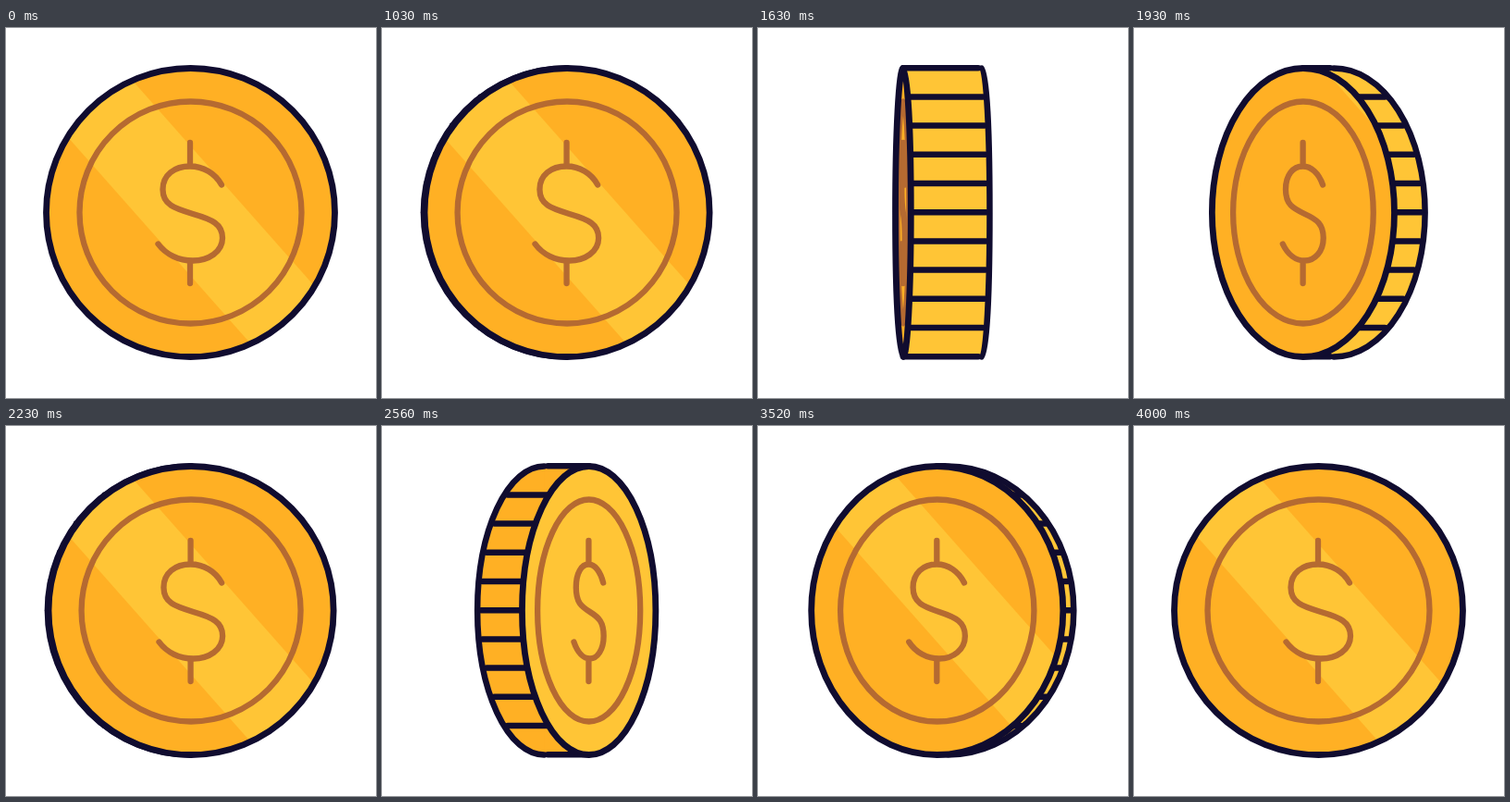
Animation, 400 px wide and 400 px high, one loop 4030 ms. Source, as an HTML page with a canvas:

```html
<!DOCTYPE html>
<html lang="en">
<head>
<meta charset="utf-8">
<title>Spinning coin</title>
<style>
html, body { margin: 0; width: 100%; height: 100%; overflow: hidden; background: #fff; }
canvas { display: block; width: 100vmin; height: 100vmin; }
</style>
</head>
<body>
<canvas id="stage"></canvas>
<script>
const LOOP = 4030, HOLD = 1000, STEP = 30;
const C = 199.5, R = 156, RING = 120, DEPTH = 45, SLOPE = 1.13;
const INK = '#100c2f', ORANGE = '#ffb024', LIGHT = '#ffc536', BROWN = '#b56a31';

const canvas = document.getElementById('stage');
const ctx = canvas.getContext('2d');
const ratio = window.devicePixelRatio || 1;
canvas.width = canvas.height = 400 * ratio;

const sign = new Path2D(
  'M0-75V-50M0 53V77M34-29.5C27-42 14-49.5 0-49.5C-17-49.5-29.5-40-29.5-24.5' +
  'C-29.5-8-17-4 3 2C24 8 35 13 35 28C35 43 20 52.5 3 52.5C-12 52.5-26 46-34.5 34.5');

function bezier(x1, y1, x2, y2) {
  const at = (a, b, s) => 3 * a * s * (1 - s) ** 2 + 3 * b * s * s * (1 - s) + s ** 3;
  return x => {
    let lo = 0, hi = 1;
    for (let i = 0; i < 30; i++) {
      const mid = (lo + hi) / 2;
      if (at(x1, x2, mid) < x) lo = mid; else hi = mid;
    }
    return at(y1, y2, lo);
  };
}

const easeIn = bezier(.2, 0, .833, .833);
const easeOut = bezier(.167, .167, .8, 1);
const settle = bezier(.167, .167, .35, 1);

// Quarter turns: first step, last step, easing, side the face points to
const turns = [
  [0, 20, easeIn, 1],
  [20, 40, easeOut, -1],
  [40, 60, easeIn, 1],
  [60, 100, settle, -1]
];

function pose(time) {
  const n = Math.min(100, Math.max(0, Math.floor((time - HOLD) / STEP + 1e-6)));
  const [from, to, ease, side] = turns.find(t => n <= t[1]);
  const e = ease((n - from) / (to - from));
  return { side, turn: side > 0 ? e : 1 - e };
}

function oval(x, rx, ry) {
  const p = new Path2D();
  p.ellipse(x, C, Math.max(rx, 0.01), ry, 0, 0, Math.PI * 2);
  return p;
}

function line(x1, x2, y) {
  ctx.beginPath();
  ctx.moveTo(x1, y);
  ctx.lineTo(x2, y);
  ctx.stroke();
}

function pen(color, width) {
  ctx.strokeStyle = color;
  ctx.lineWidth = width;
}

function drawRim(front, back, rx, side) {
  const shape = oval(back, rx, R);
  ctx.fillStyle = side > 0 ? ORANGE : LIGHT;
  ctx.fill(shape);
  ctx.fillRect(Math.min(front, back), C - R, Math.abs(front - back), 2 * R);
  pen(INK, 6.5);
  // only the outer half of the far edge is visible
  ctx.beginPath();
  ctx.ellipse(back, C, Math.max(rx, 0.01), R, 0, Math.PI / 2, -Math.PI / 2, side < 0);
  ctx.stroke();
  const gap = Math.abs(front - back);
  for (let i = -5; i <= 5; i++) {
    const edge = rx * Math.sqrt(1 - (i / 5) ** 2);
    const inset = Math.min(4, gap / 4);
    line(front - side * edge, back - side * (edge - inset), C - 0.3 + i * R / 5);
  }
}

function drawStreak(turn, side) {
  const v = turn * turn;
  const left = 139 + (side > 0 ? -800 : 1500) * v;
  const right = 263 + (side > 0 ? 800 : 900) * v;
  const top = (30 - C) / SLOPE, bottom = (370 - C) / SLOPE;
  ctx.fillStyle = LIGHT;
  ctx.beginPath();
  ctx.moveTo(left + top, 30);
  ctx.lineTo(right + top, 30);
  ctx.lineTo(right + bottom, 370);
  ctx.lineTo(left + bottom, 370);
  ctx.fill();
}

function drawFace(x, rx, turn, side) {
  const shape = oval(x, rx, R);
  const scale = rx / R;
  ctx.save();
  ctx.clip(shape);
  ctx.fillStyle = ORANGE;
  ctx.fillRect(0, 0, 400, 400);
  drawStreak(turn, side);
  pen(BROWN, 6.3);
  ctx.stroke(oval(x, RING * scale, RING));
  const mark = new Path2D();
  mark.addPath(sign, new DOMMatrix([Math.max(scale, 0.001), 0, 0, 1, x - 0.5 * scale, C - 0.5]));
  ctx.stroke(mark);
  ctx.restore();
  pen(INK, 6.8);
  ctx.stroke(shape);
}

function draw(time) {
  const { side, turn } = pose(time);
  const rx = R * (1 - turn), shift = side * DEPTH * turn;
  ctx.setTransform(ratio, 0, 0, ratio, 0, 0);
  ctx.fillStyle = '#fff';
  ctx.fillRect(0, 0, 400, 400);
  ctx.lineCap = ctx.lineJoin = 'round';
  if (turn > 0) drawRim(C + shift, C - shift, rx, side);
  drawFace(C + shift, rx, turn, side);
}

const start = performance.now();
function tick() {
  draw((performance.now() - start) % LOOP);
  requestAnimationFrame(tick);
}
tick();
</script>
</body>
</html>
```
